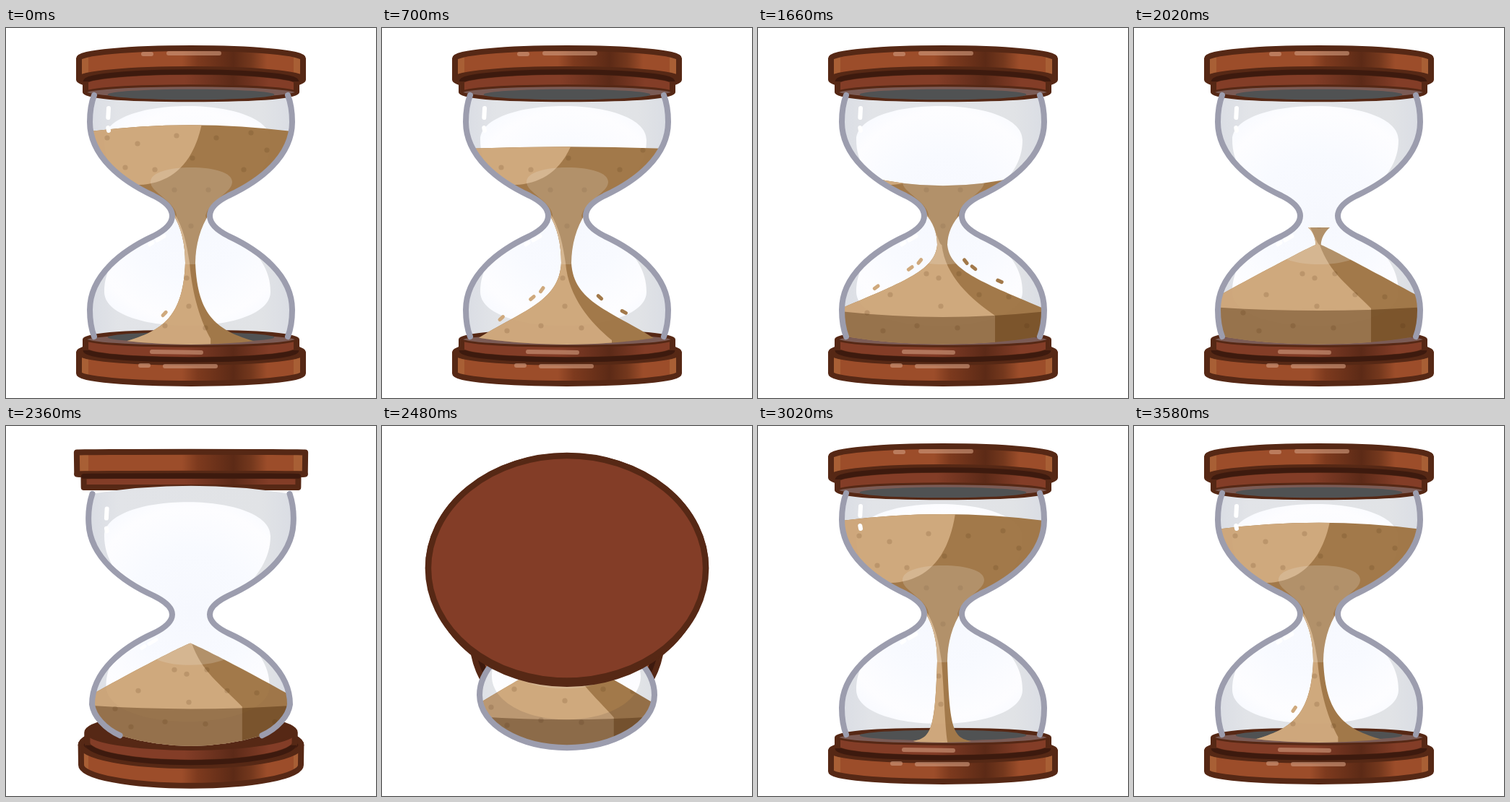
Animation, 512 px wide and 512 px high, one loop 3.6 s. Source, as an HTML page:

```html
<!DOCTYPE html>
<html lang="en">
<head>
<meta charset="utf-8">
<title>Hourglass</title>
<style>
html, body { margin: 0; width: 100%; height: 100%; overflow: hidden; background: #fff; }
svg { display: block; width: 100vw; height: 100vh; }
</style>
</head>
<body>
<svg viewBox="0 0 512 512">
  <defs>
    <linearGradient id="slab" gradientUnits="userSpaceOnUse" x1="101" x2="411" y1="0" y2="0">
      <stop offset=".042" stop-color="#a85f35"/><stop offset=".042" stop-color="#9c4d2a"/>
      <stop offset=".46" stop-color="#9c4d2a"/><stop offset=".53" stop-color="#7d3a1e"/>
      <stop offset=".69" stop-color="#5c2a16"/><stop offset=".77" stop-color="#74381d"/>
      <stop offset=".84" stop-color="#9c4d2a"/><stop offset=".958" stop-color="#9c4d2a"/>
      <stop offset=".958" stop-color="#a85f35"/>
    </linearGradient>
    <linearGradient id="step" gradientUnits="userSpaceOnUse" x1="110" x2="402" y1="0" y2="0">
      <stop offset=".47" stop-color="#833d27"/><stop offset=".7" stop-color="#5c2a18"/>
      <stop offset=".87" stop-color="#833d27"/>
    </linearGradient>
    <linearGradient id="shade" gradientUnits="userSpaceOnUse" x1="116" x2="396" y1="0" y2="0">
      <stop offset="0" stop-color="#dadde4"/><stop offset=".15" stop-color="#e2e4e8"/>
      <stop offset=".85" stop-color="#e1e3e6"/><stop offset="1" stop-color="#dadde4"/>
    </linearGradient>
    <radialGradient id="shine" gradientUnits="userSpaceOnUse" cx="256" cy="260" r="170">
      <stop offset="0" stop-color="#f6f8fe"/><stop offset=".5" stop-color="#f8faff"/>
      <stop offset=".85" stop-color="#fdfdff"/><stop offset="1" stop-color="#f8faff"/>
    </radialGradient>
  </defs>
  <g id="scene"></g>
</svg>
<script>
const scene = document.getElementById('scene');
const LOOP = 3600, TURN = 2316, REST = 2728, MID = 260;
const BROWN = '#562815', DEEP = '#3d1a0e', LIGHT = '#cfa97d', DARK = '#a2794a';

const clamp = x => Math.max(0, Math.min(1, x));
const lerp = (a, b, m) => a + (b - a) * m;
const NUM = /-?[\d.]+/g;
const mix = (a, b, m) => {
  const n = b.match(NUM);
  let i = 0;
  return a.replace(NUM, x => lerp(+x, +n[i++], m).toFixed(2));
};
const shape = (d, fill, more = '') => `<path d="${d}" fill="${fill}" ${more}/>`;
const line = (d, color, w, more = '') =>
  `<path d="${d}" fill="none" stroke="${color}" stroke-width="${w}" stroke-linecap="round" ${more}/>`;

// Left half of a bulb: neck first, distances from the neck centre
const BULB = '-26,0 -26,10 -36,20 -52,28 -95,48 -140,82 -140,130';
const BULB_FAR = '-26,2 -26,8 -36,13 -52,19 -88,33 -121,62 -121,97';
const BULB_NEAR = '-26,0 -26,3 -36,7 -50,13 -95,30 -136,62 -150,100';
const RIM = '-140,142 -139,154 -134,167';
const RIM_FAR = '-121,138 -65,170 0,170';
const RIM_NEAR = '-155,115 -155,140 -150,165';

const GLOSS = 'M136,155C136,125 190,108 251,108C312,108 366,125 366,155C366,185 350,208 320,232L320,288C350,312 366,335 366,365C366,395 312,412 251,412C190,412 136,395 136,365C136,335 152,312 182,288L182,232C152,208 136,185 136,155Z';
const GLOSS_FAR = 'M152,169C152,134 200,109 255,109C312,109 358,134 358,169C358,192 340,216 310,232L310,255C345,285 366,335 366,365C366,395 312,412 251,412C190,412 136,395 136,365C136,335 160,285 192,255L192,232C170,216 152,192 152,169Z';
const LOBE = 'M200,213C200,200 225,193 256,193C288,193 313,200 313,213C313,228 280,240 276,260C280,280 313,292 313,307C313,320 288,327 256,327C225,327 200,320 200,307C200,292 235,280 236,260C235,240 200,228 200,213Z';
const LOBE_FAR = 'M175,190C175,165 210,152 254,152C300,152 333,170 333,195C333,215 290,227 283,243C287,263 313,292 313,307C313,320 288,327 256,327C225,327 200,320 200,307C200,292 225,263 226,243C222,230 175,215 175,190Z';
const LIT = 'M276,60C280,180 235,220 172,217L90,217L90,60L276,20Z';
const LIT_FAR = 'M362,116C300,182 245,204 140,186L60,186L60,40L420,40Z';

const DOTS = '140,152 182,160 236,149 291,152 339,145 361,169 165,193 206,196 258,180 329,196 233,224 280,224 256,274 250,346 253,385 220,412 276,415 173,419 183,369 233,340 278,340 306,369 347,372 151,394 372,412'.split(' ');

// time, surface edge and centre, pile width, edge, top, controls, ridge x y, front edge and centre
const KEYS = [
  [0, 116, 107, 6, 437, 325, 400, 8, 436, 256, 437, 445, 455],
  [290, 131, 122, 40, 436, 325, 420, 15, 432, 262, 437, 445, 455],
  [870, 143, 134, 90, 434, 325, 400, 38, 419, 283, 430, 445, 455],
  [1570, 167, 164, 124, 431, 325, 380, 62, 391, 318, 432, 440, 450],
  [2530, 195, 218, 137, 387, 300, 335, 50, 350, 328, 398, 388, 400],
  [2850, 256, 256, 137, 370, 300, 301, 34, 314, 328, 388, 384, 391]
];
function sandAt(s) {
  let i = 0;
  while (i < KEYS.length - 2 && s > KEYS[i + 1][0]) i++;
  const a = KEYS[i], b = KEYS[i + 1], m = clamp((s - a[0]) / (b[0] - a[0]));
  return a.map((v, j) => lerp(v, b[j], m));
}

function hull(a, b) {
  if (a.y > b.y) [a, b] = [b, a];
  return `M${256 - a.rx},${a.y}A${a.rx},${a.ry} 0 0 1 ${256 + a.rx},${a.y}` +
    `L${256 + b.rx},${b.y}A${b.rx},${b.ry} 0 0 1 ${256 - b.rx},${b.y}Z`;
}
const oval = (r, fill, more = '') =>
  `<ellipse cx="256" cy="${r.y}" rx="${r.rx}" ry="${r.ry}" fill="${fill}" ${more}/>`;
const scaled = (r, f, dy = 0) => ({ y: r.y + dy, rx: r.rx * f, ry: r.ry * f });

// side: 1 is the cap that swings towards the viewer, -1 the other one
function cap(side, pose) {
  const k = pose.sin - side * pose.lean * Math.abs(pose.cos);
  const tilt = clamp((pose.sin - .1) * 4);
  const thick = side < 0 ? 1 - .5 * tilt : 1;
  const ring = (depth, r, dk = 0) => {
    const a = 218 - depth * thick, s = 1 / (1 - side * a * pose.sin / 1000);
    return { y: MID - side * a * pose.drop * s, rx: r * s, ry: Math.max(.01, (Math.abs(k) - dk) * r * s) };
  };
  const edge = (c, w) => `stroke="${c}" stroke-width="${w}" stroke-linejoin="round"`;
  const face = ring(0, 155), back = ring(29, 155);
  const s1 = ring(32, 146), s2 = ring(47, 146, .027);
  const slab = shape(hull(face, back), 'url(#slab)', edge(BROWN, 8));
  const step = shape(hull(s1, s2), tilt > .5 ? 'url(#slab)' : 'url(#step)', edge(BROWN, lerp(8, 4, tilt)));
  if (side > 0 && k > 0) {
    return step + slab + (k > .02 ? oval(face, '#833d27', edge(BROWN, 8.5)) : '');
  }
  const open = pose.sin < .03;
  return slab + oval(back, DEEP, edge(BROWN, 8)) + step +
    oval(s1, 'none', `${edge(DEEP, 7)} clip-path="url(#${side * pose.cos > 0 ? 'upper' : 'lower'})"`) +
    oval(scaled(s2, lerp(1, .93, tilt)), open ? '#7b5b55' : BROWN, edge(BROWN, 3)) +
    (open ? oval(scaled(s2, .79, s2.y < MID ? 3 : -3), '#505253') : '');
}

function glass(m, k, mirror) {
  const e = clamp((k - .09) * 2.7), ny = MID - 20 * m;
  const pts = (bulb, rim, dir) => (bulb + ' ' + rim).split(' ').map(p => {
    const [x, y] = p.split(',').map(Number);
    const py = ny + dir * y;
    return [256 + x, mirror ? 2 * MID - py : py];
  });
  const far = pts(mix(BULB, BULB_FAR, m), mix(RIM, RIM_FAR, e), -1);
  const near = pts(mix(BULB, BULB_NEAR, m), mix(RIM, RIM_NEAR, m), 1);
  const left = far.reverse().concat(near.slice(1));
  const right = left.map(([x, y]) => [512 - x, y]);
  const curve = p => p[0] + 'C' + p.slice(1).join(' ');
  const end = left[left.length - 1], sgn = mirror ? -1 : 1;
  const outline = 'M' + curve(left) + 'M' + curve(right);
  const body = 'M' + curve(left) + `Q256,${end[1] + sgn * 22} ` + curve(right.slice().reverse()) +
    `Q256,${left[0][1] - sgn * (22 + 110 * m) * (1 - e)} ${left[0]}Z`;
  return { outline, body, ny };
}

function grains(s, K, h) {
  if (s > 2820) return '';
  const [, , , w, edge, top, c1, c2x, c2] = K;
  const bez = (a, b, c, d, t) => {
    const q = 1 - t;
    return q * q * q * a + 3 * q * q * t * b + 3 * q * t * t * c + t * t * t * d;
  };
  // side, phase, time of first fall
  const list = [[-1, .525, 700], [1, .42, 1150], [-1, .83, 1200], [1, .02, 1300], [-1, .03, 1350], [1, .85, 1900]];
  return list.map(([dir, ph, from]) => {
    if (s < from) return '';
    const u = (s / 480 + ph) % 1, t = .32 + .58 * u;
    const at = t => [bez(h, h + 3, c2x, w, t), bez(top, c1, c2, edge, t)];
    const [x, y] = at(t), [x2, y2] = at(t + .03);
    const ang = Math.atan2(y2 - y, x2 - x) + Math.sin(u * 9) * .3;
    const hop = 6 + 6 * Math.abs(Math.sin(u * 8));
    const size = 3 * clamp(u * 10) * clamp((1 - u) * 8);
    const px = 255 + dir * (x + 4), py = y - hop;
    const dx = dir * Math.cos(ang) * size, dy = Math.sin(ang) * size;
    return size < .2 ? '' : line(`M${px - dx},${py - dy}L${px + dx},${py + dy}`, dir < 0 ? LIGHT : DARK, 5);
  }).join('');
}

function draw(t) {
  const u = clamp((t - TURN) / (REST - TURN));
  const th = Math.PI * (.5 - .5 * Math.cos(Math.PI * u));
  const cos = Math.cos(th), sin = u > 0 && u < 1 ? Math.sin(th) : 0;
  const pose = { sin, cos, drop: Math.sign(cos) * cos * cos, lean: .09 + .08 * sin };
  const k = sin + pose.lean * Math.abs(cos);
  const m = clamp((k - .09) / .62);
  const lift = 5 * sin ** .25;
  const turned = cos < 0, flipping = u > 0 && u < 1;
  const s = flipping ? (turned ? 0 : 3100) : (t - REST + LOOP) % LOOP;

  const K = sandAt(s);
  const [, , , w, edge, top, c1, c2x, c2, bx, by, fe, fc] = K;
  const eTop = K[1] - 70 * m, cTop = K[2] - 70 * m;
  const g = glass(m, k, !turned);
  const flip = turned ? '' : 'transform="matrix(1 0 0 -1 0 520)"';
  const tilt = turned ? '' : `transform="translate(${25.6 * m} ${20 * m}) scale(${1 - .1 * m} 1)"`;
  const gloss = mix(GLOSS, GLOSS_FAR, m), lobe = mix(LOBE, LOBE_FAR, m);

  // Upper sand with its stream, which thins out once the bulb is empty
  const dry = clamp((s - 2850) / 90), h = lerp(7, 0, dry);
  let pour = '', pile = '';
  if (dry < 1) {
    const y0 = lerp(g.ny - 4, top - 2, dry), hw = lerp(26, 3, dry);
    const y1 = s < 130 ? lerp(y0 + 10, 437, (s / 130) ** 2) : top + 1;
    const d = y1 - y0, a = y0 + d * .28, b = y0 + d * .64, mid = lerp(hw, h, .7);
    const side = Math.max(eTop, y0 - 6);
    const head = dry > 0 ? `M${256 - hw},${y0}` :
      `M${256 - hw},${y0}L116,${side}L116,${eTop}Q256,${2 * cTop - eTop} 396,${eTop}L396,${side}`;
    pour = head + `L${256 + hw},${y0}C${256 + mid},${a} ${255 + h},${b} ${255 + h},${y1}` +
      `L${255 - h},${y1}C${255 - h},${b} ${256 - mid},${a} ${256 - hw},${y0}Z`;
  }
  if (s >= 130) {
    const foot = Math.max(edge, 437 - w / 136 * 8);
    pile = `M${255 - h},${top}C${252 - h},${c1} ${255 - c2x},${c2} ${255 - w},${edge}L${255 - w},${foot}` +
      `Q255,${446 + 100 * m} ${255 + w},${foot}L${255 + w},${edge}` +
      `C${255 + c2x},${c2} ${258 + h},${c1} ${255 + h},${top}Z`;
  }
  const late = clamp((s - 2500) / 350), lx = lerp(254, 257, late);
  const litPile = `M230,252C246,275 ${lx - 4},300 ${lx},${top}` +
    `C${lerp(lx + 4, lerp(lx, bx, .2), late)},${lerp(top, by, .45)} ${lerp(bx, lx, .45)},${lerp(by, top, .22 + .15 * late)} ${bx},${by}` +
    `L${bx},470L80,470L80,252Z`;
  const sand = `<g clip-path="url(#glass)"><g clip-path="url(#sand)">
    <rect width="512" height="512" fill="${DARK}"/>
    ${shape(mix(LIT, LIT_FAR, m), LIGHT)}
    <g ${tilt}>${pile ? shape(litPile, LIGHT) +
      shape(`M80,${fe}Q256,${2 * fc - fe} 432,${fe}L432,490L80,490Z`, '#402000', 'opacity=".39"') : ''}</g>
    <g fill="#4a2c08" opacity=".15">${DOTS.map(p => {
      const [x, y] = p.split(',');
      return `<circle cx="${x}" cy="${y}" r="3.6"/>`;
    }).join('')}</g>
    <g ${flip}>
      ${shape('M0,0H512V512H0Z' + gloss, '#433', `fill-rule="evenodd" opacity="${.01 + .13 * m}"`)}
      ${shape(lobe, '#e6dcd2', 'opacity=".24"')}
    </g></g></g>`;

  const body = `<g clip-path="url(#glass)"><rect width="512" height="512" fill="url(#shade)"/>
    <g ${flip}>${shape(gloss, 'url(#shine)')}</g></g>`;

  const near = cap(1, pose), far = cap(-1, pose);
  const nearOpen = sin - pose.lean * Math.abs(cos) <= 0;
  const back = m > .03 ? far + (nearOpen ? near : '') + body : body + far + near;

  let ticks = '';
  if (m < .35) {
    ticks = `<g transform="translate(${-15 * m} ${40 * m})">${line('M142,111L141.3,124M141.3,138L142,142', '#fff', 6)}</g>` +
      `<g transform="translate(${-70 * m} ${65 * m})">${line('M199,300L203,297M209,294L219,288', '#fff', 5)}</g>`;
  } else if (turned) {
    ticks = line('M181,201L185,205M224,255L231,253M236,251Q245,249 248,244', '#fff', 6);
  }

  const strips = flipping ? '' : '<g opacity=".62">' +
    line('M190,36H201M225,35H295M202,448L270,449M186,467H197M220,468H290', '#cf9a7c', 6) + '</g>';

  scene.setAttribute('transform', `translate(0 ${-lift})`);
  scene.innerHTML = `<clipPath id="glass">${shape(g.body, '#000')}</clipPath>
    <clipPath id="sand">${pour ? shape(pour, '#000') : ''}${pile ? shape(pile, '#000', tilt) : ''}</clipPath>
    <clipPath id="upper"><rect width="512" height="${MID - 186 * Math.abs(pose.drop)}"/></clipPath>
    <clipPath id="lower"><rect y="${MID + 186 * Math.abs(pose.drop)}" width="512" height="512"/></clipPath>
    ${back}${strips}${sand}${flipping ? '' : grains(s, K, h)}
    ${line(g.outline, '#9c9dae', 8, 'stroke-linejoin="round"')}${ticks}
    ${nearOpen ? '' : near}`;
}

const start = performance.now();
function tick() {
  draw((performance.now() - start) % LOOP);
  requestAnimationFrame(tick);
}
tick();
</script>
</body>
</html>
```
